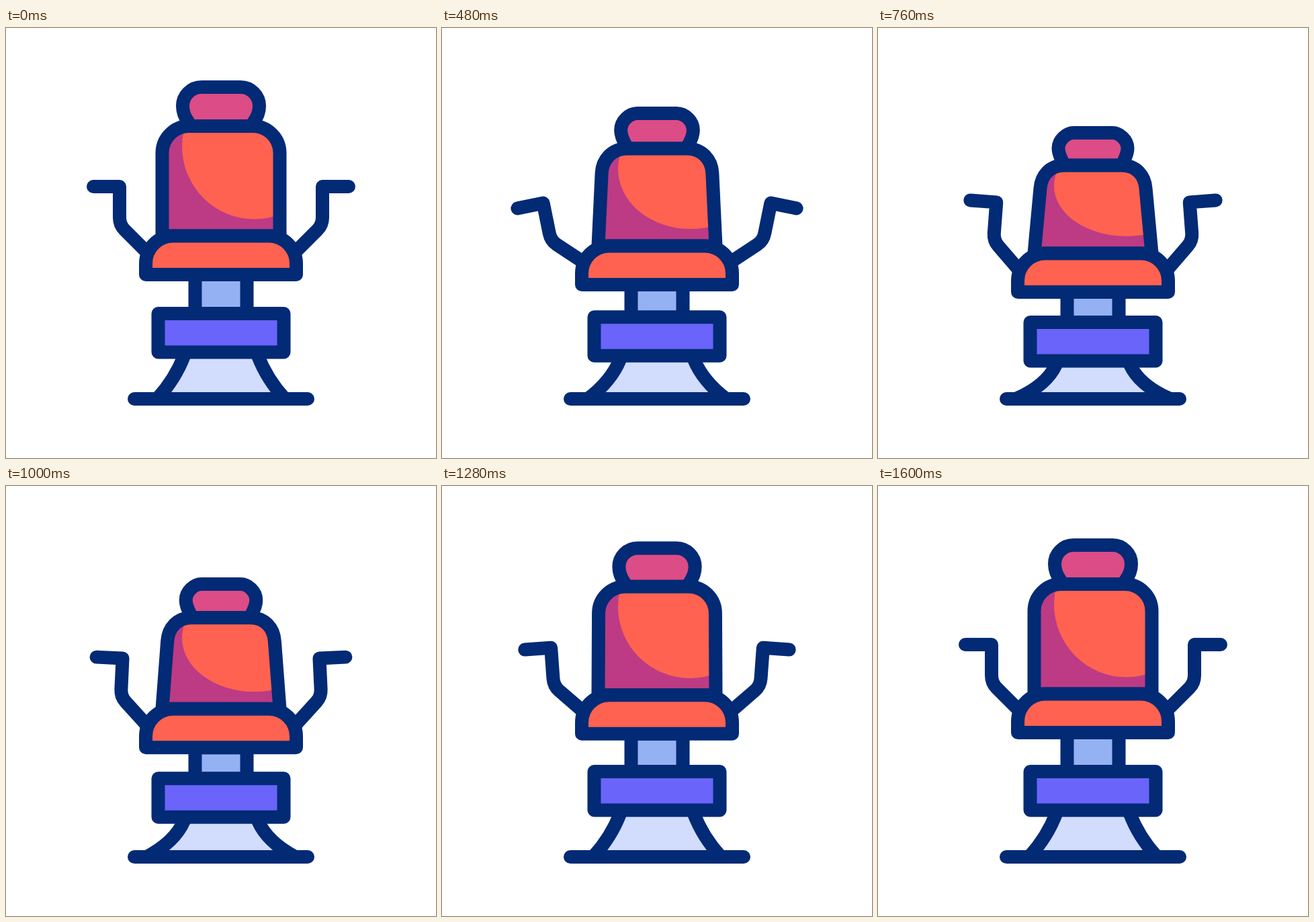
Animation of 640x640 px, one loop 1800 ms. Source, as an HTML page with a canvas:

```html
<!DOCTYPE html>
<html lang="en">
<head>
<meta charset="utf-8">
<title>Barber chair</title>
<style>
  html, body { margin: 0; height: 100%; overflow: hidden; background: #fff; }
  canvas { display: block; width: 100%; height: 100%; }
</style>
</head>
<body>
<canvas id="stage" width="640" height="640"></canvas>
<script>
const ctx = document.getElementById('stage').getContext('2d');
const LOOP = 1800, STEP = 40;
const NAVY = '#032a75', ORANGE = '#ff6250', SHADE = '#bc3b84', PINK = '#dc4c86',
      VIOLET = '#6a64fa', SKY = '#94b2f3', PALE = '#d2dcfd';

// Keyframes as [time, value], eased in and out between neighbours.
const SINK = [[225, 0], [690, 1], [888, 1], [1352, 0]];
const BASE = [[318, 0], [690, 1], [888, 1], [1264, 0]];
const SWING = [[130, 0], [412, -12.8], [840, 6], [1260, -4.2], [1595, 0]];

function track(keys, t) {
  if (t <= keys[0][0]) return keys[0][1];
  for (let i = 1; i < keys.length; i++) {
    const [t0, a] = keys[i - 1], [t1, b] = keys[i];
    if (t < t1) {
      const x = (t - t0) / (t1 - t0);
      return a + (b - a) * x * x * (3 - 2 * x);
    }
  }
  return keys[keys.length - 1][1];
}

function shape(d, fill, outlined = true) {
  const path = new Path2D(d);
  if (fill) {
    ctx.fillStyle = fill;
    ctx.fill(path);
  }
  if (outlined) ctx.stroke(path);
  return path;
}

function drawBase(q, seatY) {
  const y = 13 * q;
  const foot = 225 - 20 * q, bendX = 252 - q, bendY = 522 + 10 * q, hip = 488 + y;
  const left = `M265 ${hip}Q${bendX} ${bendY} ${foot} 552`;
  const right = `${640 - foot} 552Q${640 - bendX} ${bendY} 375 ${hip}`;
  shape(`${left}L${right}Z`, PALE, false);
  shape(`${left}M${right}`);
  shape('M191 552H449');
  shape(`M281.5 ${425 + y}V${367 + seatY}H358.5V${425 + y}`, SKY);
  shape(`M226.5 ${425 + y}H413.5V${482.5 + y}H226.5Z`, VIOLET);
}

function drawArm(side, angle, seatY) {
  ctx.save();
  ctx.translate(320, seatY);
  ctx.scale(side, 1);
  ctx.translate(-112, 332);
  ctx.rotate(angle * Math.PI / 180);
  ctx.translate(-208, -332);
  shape('M130 236H169V282Q169 293 176.5 300.5L208 332');
  ctx.restore();
}

function drawHeadrest(p) {
  const x = 263 + 5.5 * p, top = 88 + 68 * p, mid = 116 + 63 * p, end = 141 + 59 * p;
  const k = (mid - top) * 0.45, bottom = 146 + 58.5 * p, tip = 272 + 3 * p;
  const m = v => 640 - v;
  shape(`M${tip} ${end}C${x + 3} ${end - 8} ${x} ${mid + 8} ${x} ${mid}
    C${x} ${top + k} ${x + 12.5} ${top} 291 ${top}H349
    C${m(x + 12.5)} ${top} ${m(x)} ${top + k} ${m(x)} ${mid}
    C${m(x)} ${mid + 8} ${m(x + 3)} ${end - 8} ${m(tip)} ${end}
    L${m(tip)} ${bottom}H${tip}Z`, PINK);
}

function drawBack(p, seatY) {
  const x = 232.5 + 9 * p, top = 146 + 58.5 * p, side = top + 40 - 6 * p;
  const flat = 272.5 + 4.5 * p, bottom = 309.5 + seatY, k = top + 18 - 2.5 * p;
  const m = v => 640 - v;
  const d = `M232.5 ${bottom}L${x} ${side}C${x + 1.5 * p} ${k} ${flat - 22} ${top} ${flat} ${top}
    H${m(flat)}C${m(flat - 22)} ${top} ${m(x + 1.5 * p)} ${k} ${m(x)} ${side}L407.5 ${bottom}Z`;
  const path = shape(d, SHADE, false);
  const centre = 176 + 59 * p;
  ctx.save();
  ctx.clip(path);
  ctx.fillStyle = ORANGE;
  ctx.beginPath();
  ctx.ellipse(369.5, centre, 107.5, 284.5 + 25.5 * p - centre, 0, 0, 2 * Math.PI);
  ctx.fill();
  ctx.restore();
  ctx.stroke(path);
}

function drawSeat(seatY) {
  ctx.save();
  ctx.translate(0, seatY);
  shape('M208 367V350.5A41 41 0 0 1 249 309.5H391A41 41 0 0 1 432 350.5V367Z', ORANGE);
  ctx.restore();
}

function draw(t) {
  const sink = track(SINK, t), seatY = 26 * sink, swing = track(SWING, t);
  ctx.fillStyle = '#fff';
  ctx.fillRect(0, 0, 640, 640);
  ctx.strokeStyle = NAVY;
  ctx.lineWidth = 20;
  ctx.lineCap = ctx.lineJoin = 'round';
  drawBase(track(BASE, t), seatY);
  drawArm(1, swing, seatY);
  drawArm(-1, swing, seatY);
  drawHeadrest(sink);
  drawBack(sink, seatY);
  drawSeat(seatY);
}

const start = performance.now();
function frame() {
  const t = (performance.now() - start) % LOOP;
  draw(Math.floor(t / STEP) * STEP);
  requestAnimationFrame(frame);
}
frame();
</script>
</body>
</html>
```
